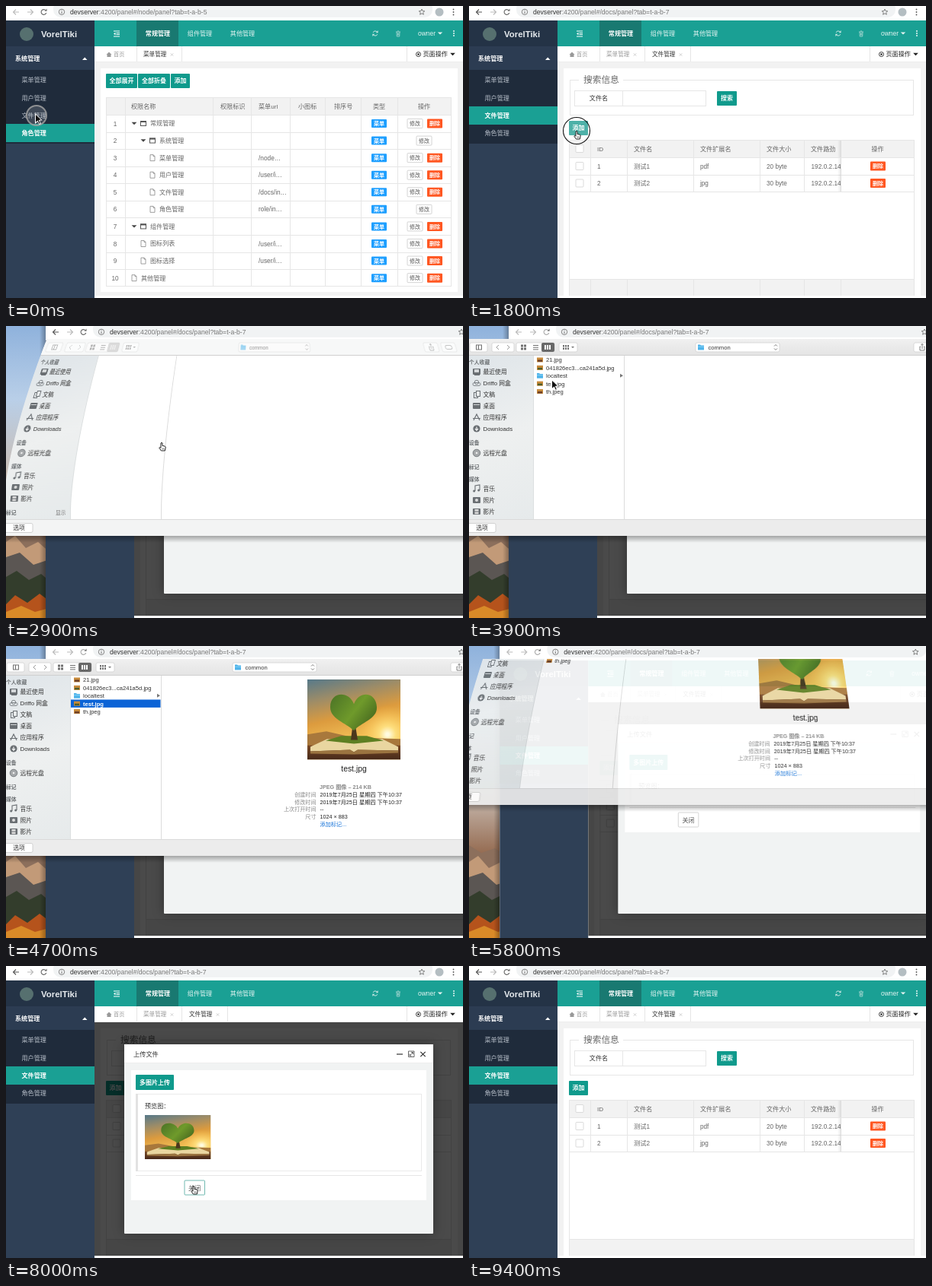
An HTML page with a canvas for the animation above (9.5 s loop, 599 px wide and 384 px high).

```html
<!DOCTYPE html>
<html lang="zh">
<head>
<meta charset="utf-8">
<title>Picture upload</title>
<style>
html,body{margin:0;width:100%;height:100%;overflow:hidden;background:#fff}
canvas{display:block;width:599px;height:384px}
</style>
</head>
<body>
<canvas id="stage" width="599" height="384"></canvas>
<script>
const LOOP = 9500, TEAL = '#1aa094', BTN = '#0f9a8c', ORANGE = '#ff5722';
const PAN = 52, TOP = 17, SHEET_H = 259, MARGIN = 10, SHEET_W = 720;
const FONT = "'Liberation Sans','Noto Sans CJK SC','Noto Sans CJK',sans-serif";
const main = document.getElementById('stage').getContext('2d');
const sheetCanvas = document.createElement('canvas');
sheetCanvas.width = SHEET_W;
sheetCanvas.height = SHEET_H;
const sheetCtx = sheetCanvas.getContext('2d');
let c = main;

// ---------- helpers ----------
function box(x, y, w, h, fill, line) {
  if (fill) { c.fillStyle = fill; c.fillRect(x, y, w, h); }
  if (line) { c.strokeStyle = line; c.lineWidth = 1; c.strokeRect(x + .5, y + .5, w - 1, h - 1); }
}
function round(x, y, w, h, r, fill, line) {
  c.beginPath();
  c.roundRect(x, y, w, h, r);
  if (fill) { c.fillStyle = fill; c.fill(); }
  if (line) { c.strokeStyle = line; c.lineWidth = .8; c.stroke(); }
}
function text(s, x, y, size = 8, color = '#666', align = 'left', weight = 400) {
  c.font = `${weight} ${size}px ${FONT}`;
  c.fillStyle = color;
  c.textAlign = align;
  c.textBaseline = 'alphabetic';
  c.fillText(s, x, y + size * .37);
}
function path(color, width, ...lines) {
  c.strokeStyle = color;
  c.lineWidth = width;
  c.beginPath();
  for (const p of lines)
    for (let i = 0; i < p.length; i += 2) i ? c.lineTo(p[i], p[i + 1]) : c.moveTo(p[0], p[1]);
  c.stroke();
}
function poly(color, ...p) {
  c.fillStyle = color;
  c.beginPath();
  for (let i = 0; i < p.length; i += 2) c.lineTo(p[i], p[i + 1]);
  c.closePath();
  c.fill();
}
function disc(x, y, r, fill, line, width = 1) {
  c.beginPath();
  c.arc(x, y, r, 0, 7);
  if (fill) { c.fillStyle = fill; c.fill(); }
  if (line) { c.strokeStyle = line; c.lineWidth = width; c.stroke(); }
}
function grad(x0, y0, x1, y1, ...colors) {
  const g = c.createLinearGradient(x0, y0, x1, y1);
  colors.forEach((k, i) => g.addColorStop(i / (colors.length - 1), k));
  return g;
}
const vline = (x, y0, y1, color = '#e6e6e6') => box(x, y0, 1, y1 - y0, color);
const hline = (x0, x1, y, color = '#e6e6e6') => box(x0, y, x1 - x0, 1, color);
const down = (x, y, r, color) => poly(color, x - r, y - r / 2, x + r, y - r / 2, x, y + r / 2);
const cross = (x, y, r, color, w = 1) => path(color, w, [x - r, y - r, x + r, y + r], [x - r, y + r, x + r, y - r]);
function button(s, x, y, w, h, fill = BTN, size = 8) {
  round(x, y, w, h, 1, fill);
  text(s, x + w / 2, y + h / 2, size, '#fff', 'center', 700);
}
function key(t, points, ease) {
  if (t <= points[0][0]) return points[0][1];
  for (let i = 1; i < points.length; i++) {
    const [t0, a] = points[i - 1], [t1, b] = points[i];
    if (t <= t1) {
      let u = (t - t0) / (t1 - t0);
      if (ease) u = u * u * (3 - 2 * u);
      return a + (b - a) * u;
    }
  }
  return points[points.length - 1][1];
}

// ---------- browser ----------
function browserBar(t) {
  const file = t >= 300, idle = !file || (t >= 3000 && t < 6200);
  const back = idle ? '#bbb' : '#555';
  box(0, 0, 599, 19, '#fff');
  round(62, -6, 497, 21, 10, '#f1f3f4');
  path(back, 1.1, [17, 8, 9.5, 8], [13, 4.5, 9.5, 8, 13, 11.5]);
  path('#bbb', 1.1, [28, 8, 35.5, 8], [32, 4.5, 35.5, 8, 32, 11.5]);
  c.beginPath(); c.arc(49.5, 8, 3.4, .3, 5.6); c.strokeStyle = idle && file ? '#aaa' : '#666'; c.lineWidth = 1.1; c.stroke();
  poly('#777', 50.5, 6.8, 53.6, 6.8, 53.6, 3.6);
  disc(73, 7.8, 3.7, null, '#777', .9);
  path('#777', 1, [73, 7.2, 73, 10], [73, 5.3, 73, 6.2]);
  text('devserver', 84, 8, 8.6, '#333');
  const w = c.measureText('devserver').width;
  text(file ? ':4200/panel#/docs/panel?tab=t-a-b-7' : ':4200/panel#/node/panel?tab=t-a-b-5', 84 + w, 8, 8.6, '#777');
  c.beginPath();
  for (let i = 0; i < 10; i++) {
    const a = i * Math.PI / 5 - Math.PI / 2, r = i % 2 ? 1.8 : 4;
    c.lineTo(545 + r * Math.cos(a), 8 + r * Math.sin(a));
  }
  c.closePath(); c.strokeStyle = '#666'; c.lineWidth = .8; c.stroke();
  disc(568, 8, 5.5, '#b4bec2');
  for (const y of [4.5, 8, 11.5]) disc(586.5, y, .9, '#555');
}
function topBar() {
  box(0, 19, 116, 35, '#243346');
  disc(27, 37, 9, '#56706f');
  text('VorelTiki', 46, 37, 11.4, '#e6eaee', 'left', 700);
  box(116, 19, 483, 34, TEAL);
  box(171, 19, 55, 34, '#197971');
  path('#fff', 1, [141, 33, 149, 33], [144.5, 35.5, 149, 35.5], [144.5, 37.5, 149, 37.5], [141, 40, 149, 40]);
  poly('#fff', 141, 36.5, 143.5, 34.7, 143.5, 38.3);
  text('常规管理', 199, 36, 8.1, '#fff', 'center', 700);
  text('组件管理', 254, 36, 8.1, '#e4f4f2', 'center');
  text('其他管理', 310, 36, 8.1, '#e4f4f2', 'center');
  const pale = '#c9e8e4';
  for (const a of [.4, 3.5]) { c.beginPath(); c.arc(484, 36, 3.1, a, a + 2.4); c.strokeStyle = pale; c.lineWidth = 1; c.stroke(); }
  poly(pale, 487.6, 32, 487.6, 35.2, 484.8, 35.2);
  poly(pale, 480.4, 40, 480.4, 36.8, 483.2, 36.8);
  path('#a3d5d0', .9, [511, 34, 517, 34], [512, 34, 512.3, 40, 515.7, 40, 516, 34], [513, 33, 515, 33], [513.5, 35.5, 513.5, 38.5], [514.8, 35.5, 514.8, 38.5]);
  text('owner', 540, 36, 8.5, '#e4f4f2');
  down(569, 36, 3.2, '#e4f4f2');
  for (const y of [33, 36, 39]) disc(587, y, .9, '#fff');
}
function sidebar(t) {
  box(0, 54, 116, 330, '#2f4056');
  box(0, 53, 116, 31, '#2c3c52');
  text('系统管理', 12, 69, 8.1, '#fff', 'left', 700);
  poly('#fff', 100, 71, 106.5, 71, 103.2, 67.5);
  box(0, 84, 116, 97, '#1f2b3b');
  const on = t < 200 ? 3 : 2;
  ['菜单管理', '用户管理', '文件管理', '角色管理'].forEach((s, i) => {
    const y = 97.3 + i * 23.3;
    if (i === on) box(0, Math.round(y - 12), 116, 24, TEAL);
    text(s, 20.5, y, 8.1, i === on ? '#fff' : '#b6bec8', 'left', i === on ? 700 : 400);
  });
}
function tabs(t) {
  const file = t >= 300;
  box(116, 53, 483, 21, '#fff');
  poly('#999', 131.5, 64, 135, 60.5, 138.5, 64, 137.5, 64, 137.5, 67, 132.5, 67, 132.5, 64);
  text('首页', 141, 63.5, 7.2, '#999');
  vline(171, 53, 74);
  text('菜单管理', 180, 63.5, 7.6, file ? '#999' : '#333');
  cross(217.5, 64, 1.7, '#c4c4c4', .8);
  vline(230, 53, 74);
  if (file) {
    text('文件管理', 240, 63.5, 7.6, '#333');
    cross(277.5, 64, 1.7, '#c4c4c4', .8);
    vline(290, 53, 74);
  }
  vline(525, 53, 74);
  disc(540.5, 63.5, 3, null, '#222', .9);
  disc(540.5, 63.5, 1.2, '#222');
  text('页面操作', 546.5, 63.5, 8.1, '#222');
  down(585.5, 63.5, 3.3, '#222');
  hline(116, 599, 73, '#eee');
}

// ---------- pages ----------
function smallButton(s, x, y, fill) {
  const w = 20, h = 12;
  if (fill) { button(s, x, y - h / 2, w, h, fill, 7); return; }
  round(x, y - h / 2, w, h, 1, '#fff', '#c9c9c9');
  text(s, x + w / 2, y, 7, '#555', 'center');
}
function folderIcon(x, y) {
  box(x - 4, y - 3.5, 8, 7, null, '#555');
  box(x - 4, y - 3.5, 8, 2, '#555');
}
function fileIcon(x, y) {
  path('#888', .8, [x + 1, y - 4, x - 3, y - 4, x - 3, y + 4, x + 3, y + 4, x + 3, y - 2, x + 1, y - 4, x + 1, y - 2, x + 3, y - 2]);
}
function menuPage() {
  box(124, 82, 468, 294, '#fff');
  button('全部展开', 131, 89, 41, 19);
  button('全部折叠', 173, 89, 42, 19);
  button('添加', 216, 89, 25, 19);
  box(131, 120, 453, 23, '#f2f2f2');
  [['权限名称', 164], ['权限标识', 281], ['菜单url', 331], ['小图标', 383], ['排序号', 430], ['类型', 481], ['操作', 540]]
    .forEach(([s, x]) => text(s, x, 132, 8.1));
  // name, depth, open folder, url
  const rows = [['常规管理', 0, 1], ['系统管理', 1, 1], ['菜单管理', 2, 0, '/node…'], ['用户管理', 2, 0, '/user/i…'],
    ['文件管理', 2, 0, '/docs/in…'], ['角色管理', 2, 0, 'role/in…'], ['组件管理', 0, 1], ['图标列表', 1, 0, '/user/i…'],
    ['图标选择', 1, 0, '/user/i…'], ['其他管理', 0, 0]];
  rows.forEach(([name, depth, open, url], i) => {
    const y = 154.5 + i * 22.57, x = 168 + depth * 12;
    hline(131, 584, Math.round(y - 11.5));
    text(i + 1, 143, y, 8.2, '#666', 'center');
    if (open) { down(x, y, 3.4, '#444'); folderIcon(x + 12, y); }
    else fileIcon(x, y);
    text(name, x + (open ? 21 : 9), y, 8.1);
    if (url) text(url, 331, y, 8.3);
    button('菜单', 479, y - 5.5, 20, 11, '#1e9fff', 7);
    if (i === 1 || i === 5) smallButton('修改', 538, y);
    else { smallButton('修改', 526, y); smallButton('删除', 552, y, ORANGE); }
  });
  for (const x of [131, 156, 271, 321, 372, 418, 465, 513, 583]) vline(x, 120, 369);
  hline(131, 584, 120);
  hline(131, 584, 368);
}
function filePage(t) {
  box(124, 82, 468, 299, '#fff');
  box(132, 97, 451, 47, null, '#e6e6e6');
  box(144, 92, 58, 10, '#fff');
  text('搜索信息', 150, 97, 11.7);
  box(138, 111, 173, 21, null, '#e6e6e6');
  vline(201, 111, 132);
  text('文件名', 170, 121.5, 8.1, '#333', 'center');
  button('搜索', 325, 112, 26, 19);
  button('添加', 131, 151, 25, 19, t >= 1500 && t < 2100 ? '#3aa89e' : BTN);
  box(131, 176, 453, 23, '#f2f2f2');
  const cols = [159, 207, 294, 381, 439];
  ['ID', '文件名', '文件扩展名', '文件大小', '文件路劲'].forEach((s, i) => text(s, cols[i] + 9, 188, 8.1));
  text('操作', 535.5, 188, 8.1, '#666', 'center');
  round(140, 182.5, 10, 10, 1, '#fff', '#d2d2d2');
  const loaded = t >= 500;
  if (loaded) [['1', '测试1', 'pdf', '20 byte'], ['2', '测试2', 'jpg', '30 byte']].forEach((row, i) => {
    const y = 210.5 + i * 22.5;
    round(140, y - 5, 10, 10, 1, '#fff', '#d2d2d2');
    row.forEach((s, j) => text(s, cols[j] + 9, y, 8.2));
    c.save();
    c.beginPath(); c.rect(440, y - 9, 47, 18); c.clip();
    text('192.0.2.144', 448.5, y, 8.3);
    c.restore();
    smallButton('删除', 526, y, ORANGE);
    hline(131, 584, Math.round(y + 11));
  });
  const end = loaded ? 244 : 199;
  cols.forEach(x => vline(x, 176, end));
  c.fillStyle = grad(483, 0, 488, 0, 'rgba(0,0,0,0)', 'rgba(0,0,0,.1)');
  c.fillRect(483, 176, 5, end - 176);
  vline(487, 176, end, '#ddd');
  hline(131, 584, 176);
  hline(131, 584, 199);
  box(131, 360, 453, 21, '#f2f2f2');
  hline(131, 584, 359);
  if (t < 2000) [...cols, 487].forEach(x => vline(x, 360, 381));
  vline(131, 176, 381);
  vline(583, 176, 381);
}

// Heart-shaped tree over an open book, in flat shapes
function photo(x, y, w, h) {
  c.save();
  c.translate(x, y);
  c.scale(w / 122, h / 105);
  c.beginPath(); c.rect(0, 0, 122, 105); c.clip();
  box(0, 0, 122, 105, grad(0, 0, 20, 85, '#56798a', '#9c8c68', '#dc9b3e', '#f0bd55'));
  const sun = c.createRadialGradient(105, 72, 2, 105, 72, 38);
  sun.addColorStop(0, '#fffbe0');
  sun.addColorStop(.25, 'rgba(255,226,130,.9)');
  sun.addColorStop(1, 'rgba(255,190,70,0)');
  box(0, 0, 122, 105, sun);
  poly('#a8783c', 0, 72, 25, 68, 60, 76, 122, 78, 122, 86, 0, 86);
  box(0, 86, 122, 19, grad(0, 86, 0, 105, '#7a4a26', '#46291a'));
  poly('#e9d6a0', 4, 88, 26, 78, 61, 82, 98, 78, 119, 88, 119, 93, 66, 92, 61, 95, 56, 92, 4, 94);
  poly('#9b7440', 4, 94, 56, 92, 61, 95, 66, 92, 119, 93, 119, 96, 61, 98, 4, 97);
  poly('#5e7f22', 24, 80, 44, 74, 78, 74, 100, 80, 61, 84);
  poly('#4b371d', 57, 79, 60, 55, 62, 55, 66, 79);
  c.fillStyle = grad(32, 20, 90, 65, '#4c7426', '#6f9a2b', '#3c5c1c');
  c.beginPath();
  c.moveTo(61, 32);
  c.bezierCurveTo(54, 14, 30, 16, 30, 36);
  c.bezierCurveTo(30, 52, 50, 56, 61, 67);
  c.bezierCurveTo(70, 56, 92, 52, 91, 36);
  c.bezierCurveTo(90, 16, 68, 14, 61, 32);
  c.fill();
  c.restore();
}
function dialog(t) {
  const show = key(t, [[1900, 0], [2200, 1], [8200, 1], [8500, 0]]);
  if (!show) return;
  c.globalAlpha = show;
  box(116, 74, 483, 307, 'rgba(0,0,0,.71)');
  c.save();
  c.translate(357.5, 227.5);
  c.scale(.6 + .4 * show, .6 + .4 * show);
  c.translate(-357.5, -227.5);
  c.save();
  c.shadowColor = 'rgba(0,0,0,.35)';
  c.shadowBlur = 16;
  round(155, 103, 405, 249, 1, '#f1f3f3');
  c.restore();
  box(155, 103, 405, 25, '#fff');
  hline(155, 560, 127, '#eee');
  text('上传文件', 167, 115.5, 8.2, '#333');
  path('#333', 1.2, [512, 116, 520, 116]);
  path('#444', .8, [527.5, 112, 535, 112, 535, 119.5, 527.5, 119.5, 527.5, 112], [529, 118, 533.5, 113.5], [531, 113.5, 533.5, 113.5, 533.5, 116], [529, 115.5, 529, 118, 531.5, 118]);
  cross(546.5, 116, 3.2, '#333', 1.2);
  const full = t >= 6300, dy = full ? 63 : 0;
  box(164, 137, 387, 108 + dy, '#fff');
  button('多图片上传', 170, 143, 50, 20, t >= 2400 && t < 3000 ? '#3aa89e' : BTN);
  box(170, 168, 375, 39 + dy, null, '#eaeaea');
  box(170, 168, 3, 39 + dy, '#e2e2e2');
  text('预览图：', 182, 184, 8.1, '#333');
  if (full) photo(182, 196, 86.5, 58);
  hline(170, 545, 212 + dy);
  const hover = t >= 7400 && t < 8500;
  round(234, 219 + dy, 26.5, 19, 1, '#fff', hover ? '#4fa99f' : '#c9c9c9');
  text('关闭', 247.2, 229 + dy, 8.1, '#555', 'center');
  c.restore();
  c.globalAlpha = 1;
}

// ---------- desktop and file chooser ----------
function wallpaper() {
  box(0, 0, 60, 384, grad(0, 0, 0, 290, '#8fb2dc', '#b9cfe8', '#c9bdb4', '#8a5a3c'));
  poly('#8c6f5c', 0, 262, 16, 272, 34, 266, 60, 284, 60, 384, 0, 384);
  poly('#c29a78', 0, 284, 12, 276, 26, 292, 42, 284, 60, 300, 60, 326, 0, 318);
  poly('#5b5653', 0, 304, 18, 298, 36, 314, 60, 306, 60, 345, 0, 345);
  poly('#333d2c', 0, 330, 14, 322, 30, 334, 46, 326, 60, 338, 60, 384, 0, 384);
  poly('#b5531c', 0, 366, 12, 354, 28, 364, 44, 352, 60, 364, 60, 384, 0, 384);
  poly('#d98a28', 0, 376, 20, 368, 38, 376, 60, 370, 60, 384, 0, 384);
}
function sideIcon(kind, x, y) {
  const g = '#6a6f73';
  if (kind === 'disc') { disc(x, y, 4.8, '#a5a8aa', g, .8); disc(x, y, 1.3, '#eee'); }
  else if (kind === 'down') { disc(x, y, 4.6, g); path('#fff', 1.1, [x, y - 2.5, x, y + 2], [x - 2, y, x, y + 2.3, x + 2, y]); }
  else if (kind === 'cloud') { round(x - 5, y - .5, 10, 4, 2, null, g); disc(x, y - 1, 2.7, null, g, .8); }
  else if (kind === 'app') path(g, 1.2, [x - 4, y + 4, x, y - 4, x + 4, y + 4], [x - 5, y + 1.5, x + 5, y + 1.5]);
  else if (kind === 'note') { path(g, 1.1, [x - 2, y + 3, x - 2, y - 4, x + 4, y - 5, x + 4, y + 2]); disc(x - 3.3, y + 3, 1.5, g); disc(x + 2.7, y + 2, 1.5, g); }
  else if (kind === 'doc') { box(x - 4, y - 3, 6, 8, null, g); box(x - 1, y - 5, 6, 8, '#e7eaeb', g); }
  else {
    round(x - 5, y - 4, 10, 8, 1, g);
    if (kind === 'film') { box(x - 2.5, y - 3, 5, 2.6, '#ddd'); box(x - 2.5, y + .6, 5, 2.6, '#ddd'); }
    if (kind === 'cam') disc(x, y, 2, '#ddd');
    if (kind === 'desk') hline(x - 4, x + 4, y - 2, '#d0d3d5');
    if (kind === 'clock') { box(x - 3, y - 3, 6, 4, '#d5d8da'); box(x - 3, y + 3.5, 7, 1.5, g); }
  }
}
function folder(x, y) {
  poly('#4fb4ea', x - 4, y - 3.4, x - 1, y - 3.4, x, y - 2.4, x + 4, y - 2.4, x + 4, y + 3.4, x - 4, y + 3.4);
  hline(x - 4, x + 4, y - 1.2, '#86d0f6');
}
function sheetToolbar(early) {
  box(-4, TOP, 710, 22, early ? '#f7f8f8' : grad(0, TOP, 0, 39, '#f0f0f0', '#e4e4e4'));
  c.globalAlpha = early ? .5 : 1;
  const line = '#d2d2d2', ink = '#707070';
  for (const [x, w] of [[1, 23], [30, 29], [62, 50], [118, 24], [297, 110], [583, 22], [610, 22]]) round(x, 22, w, 12, 2, '#fff', line);
  box(9, 24.5, 8, 7, null, ink); vline(12, 25, 31, ink);
  path('#999', 1, [39, 25, 36, 28, 39, 31], [50, 25, 53, 28, 50, 31]);
  for (let i = 0; i < 4; i++) box(68 + i % 2 * 4, 24.5 + (i >> 1) * 4, 3, 3, ink);
  for (let i = 0; i < 3; i++) hline(84, 91, 25 + i * 2.7, ink);
  round(95, 22, 17, 12, 2, early ? '#bbb' : '#686868');
  for (let i = 0; i < 3; i++) box(99 + i * 3, 25, 2, 6, '#fff');
  for (let i = 0; i < 6; i++) box(123 + i % 3 * 3, 25 + (i / 3 | 0) * 3.5, 2, 2.5, ink);
  down(136, 28, 2, ink);
  folder(304, 28);
  text('common', 313.5, 28, 7.6, '#333');
  path(ink, .9, [400, 26.5, 402, 24.5, 404, 26.5], [400, 29.5, 402, 31.5, 404, 29.5]);
  path(ink, .9, [592, 27, 591, 27, 591, 32, 597, 32, 597, 27, 596, 27], [594, 30, 594, 23.5], [592.5, 25, 594, 23.5, 595.5, 25]);
  round(616, 25.5, 10, 5, 2, null, ink);
  c.globalAlpha = 1;
  hline(-4, 706, 38, '#d0d0d0');
}
function sheetBody(t) {
  const early = t < 3100, picked = t >= 4000;
  sheetToolbar(early);
  box(-4, 39, 89, 215, grad(0, 39, 85, 254, '#dfe5e9', '#eef0f0', '#e6eaeb'));
  box(85, 39, 621, 215, '#fff');
  vline(84, 39, 254, '#dcdfe0');
  vline(203, 39, 254, '#dcdcdc');
  const head = (s, y) => text(s, 0, y, 6.8, '#6b6f72', 'left', 700);
  head('个人收藏', 47);
  [['clock', '最近使用'], ['cloud', 'Driffo 网盒'], ['doc', '文稿'], ['desk', '桌面'], ['app', '应用程序'], ['down', 'Downloads']]
    .forEach(([k, s], i) => { sideIcon(k, 10, 60 + i * 15); text(s, 18.5, 60 + i * 15, 7.8, '#333'); });
  head('设备', 153.5);
  sideIcon('disc', 10, 167); text('远程光盘', 18.5, 167, 7.8, '#333');
  const dy = early ? 0 : 17;
  head('媒体', 184 + dy);
  [['note', '音乐'], ['cam', '照片'], ['film', '影片']]
    .forEach(([k, s], i) => { sideIcon(k, 10, 197 + dy + i * 15); text(s, 18.5, 197 + dy + i * 15, 7.8, '#333'); });
  head('标记', early ? 245 : 185);
  if (early) text('显示', 65, 245, 6.8, '#777');
  if (!early) ['21.jpg', '041826ec3...ca241a5d.jpg', 'localtest', 'test.jpg', 'th.jpeg'].forEach((s, i) => {
    const y = 44.5 + i * 10.4, on = picked && i === 3;
    if (on) box(85, y - 5.2, 117.5, 10.4, '#0b63d6');
    if (i === 2) { folder(93, y); poly('#777', 198, y - 2.5, 202, y, 198, y + 2.5); }
    else { box(89, y - 3, 8, 6, '#c78a3a'); box(90, y, 6, 2.4, i % 2 ? '#4d5d2a' : '#6b3f2a'); }
    text(s, 101, y, 7.6, on ? '#fff' : '#333', 'left', on ? 700 : 400);
  });
  if (picked) {
    photo(395, 44, 122, 105.5);
    text('test.jpg', 456, 161.5, 10.4, '#222', 'center');
    text('JPEG 图像 – 214 KB', 411, 185, 7.2, '#8a8a8a', 'left', 700);
    const date = '2019年7月25日 星期四 下午10:37';
    [['创建时间', date], ['修改时间', date], ['上次打开时间', '--'], ['尺寸', '1024 × 883'], ['', '添加标记...']].forEach(([a, b], i) => {
      const y = 195 + i * 9.9;
      text(a, 406.5, y, 7.1, '#8a8a8a', 'right');
      text(b, 411.5, y, 7.2, i === 4 ? '#1673d8' : '#222');
    });
  }
  box(-4, 254, 710, 22, early ? '#f3f4f4' : '#ececec');
  hline(-4, 706, 254, '#dadada');
  round(-3, 259.5, 38, 12, 2, '#fff', '#c8c8c8');
  text('选项', 17, 265.5, 7.8, '#333', 'center');
}
function drawSheet(t, lift, pan) {
  const bend = key(t, [[2400, .02], [2800, .0185], [2900, .017], [3200, 0], [5500, 0], [5700, .011], [5800, .0142], [6100, .021]]);
  const flare = t > 5000 ? 14 * Math.min(1, lift / 67) : 0;
  c.save();
  c.globalAlpha = lift ? .93 : 1;
  const bottom = TOP + SHEET_H - lift;
  if (!bend && !flare) {
    box(-4, bottom, 710, 9, grad(0, bottom, 0, bottom + 9, 'rgba(0,0,0,.32)', 'rgba(0,0,0,0)'));
    sheetBody(t);
  } else {
    box(0, bottom, 599, 9, grad(0, bottom, 0, bottom + 9, 'rgba(0,0,0,.32)', 'rgba(0,0,0,0)'));
    c = sheetCtx;
    c.clearRect(0, 0, SHEET_W, SHEET_H);
    c.save();
    c.translate(MARGIN, -TOP);
    sheetBody(t);
    c.restore();
    c = main;
    const cx = 298 + pan;
    for (let y = TOP; y < bottom; y++) {
      const shift = bend * Math.max(0, 240 - y) ** 1.5 - flare, s = 1 - shift / 350;
      const src = Math.min(SHEET_H - 1, Math.floor(y - TOP + lift));
      c.drawImage(sheetCanvas, 0, src, SHEET_W, 1, cx - SHEET_W / 2 * s, y, SHEET_W * s, 1);
    }
  }
  c.restore();
}

// ---------- pointer ----------
function hand(x, y) {
  c.save();
  c.translate(x, y);
  c.beginPath();
  c.moveTo(-2, 0); c.lineTo(-2, -5); c.quadraticCurveTo(-1, -6.4, 0, -5); c.lineTo(0, -1.6);
  c.lineTo(3.2, -.9); c.quadraticCurveTo(4.4, -.4, 4.2, 1); c.lineTo(3.3, 5); c.lineTo(-1.6, 5);
  c.lineTo(-4.2, 1.2); c.quadraticCurveTo(-4, -.4, -2, 1.2);
  c.closePath();
  c.fillStyle = '#fff'; c.fill();
  c.strokeStyle = '#222'; c.lineWidth = 1; c.stroke();
  path('#222', .7, [0, 1.5, 0, 3.5], [1.8, 1.5, 1.8, 3.5]);
  c.restore();
}
function arrow(x, y) {
  c.save();
  c.translate(x - 3, y - 5);
  poly('#fff', -1, -2, 8.5, 7.3, 5, 7.8, 7, 12, 4.4, 13, 2.5, 9, -1, 12);
  poly('#111', 0, 0, 6.8, 6.6, 3.8, 6.9, 5.8, 11.2, 4.6, 11.8, 2.7, 7.4, 0, 9.8);
  c.restore();
}
function ring(t, at, x, y) {
  const u = (t - at) / 300;
  if (u < 0 || u > 1) return;
  const strong = at === 1700;
  disc(x, y, strong ? 15.5 + 6 * u : 13 + 8 * u, `rgba(255,255,255,${.15 * (1 - u)})`,
    strong ? `rgba(20,20,20,${Math.min(1, 1.5 * (1 - u))})` : `rgba(160,160,160,${.85 * (1 - u)})`, strong ? 1.1 : 2);
}
function pointer(t) {
  const x = key(t, [[500, 42], [1500, 142], [2100, 142], [2450, 205], [3400, 205], [3900, 112], [4200, 112], [4600, 620], [6350, 620], [7500, 247], [8500, 247], [9300, 620]], true);
  const y = key(t, [[500, 148], [1500, 170], [2100, 170], [2450, 159], [3400, 159], [3900, 77], [4200, 77], [4600, 250], [6350, 250], [7500, 295], [8500, 295], [9300, 240]], true);
  ring(t, 0, 40, 144);
  ring(t, 1700, 141, 164);
  ring(t, 2500, 204, 154);
  ring(t, 4000, 109, 73);
  ring(t, 8100, 246, 290);
  const free = t < 100 || (t > 600 && t < 1400) || (t > 3300 && t < 7300) || t > 8500;
  (free ? arrow : hand)(x, y);
}

function draw(t) {
  c = main;
  c.clearRect(0, 0, 599, 384);
  const lift = key(t, [[2400, SHEET_H], [2600, 140], [2800, 22], [2900, 0], [5600, 0], [5800, 67], [6100, SHEET_H]]);
  const pan = PAN * (1 - lift / SHEET_H) ** .85;
  if (pan > 0) {
    wallpaper();
    box(pan - 8, 0, 8, 384, grad(pan - 8, 0, pan, 0, 'rgba(0,0,0,0)', 'rgba(0,0,0,.3)'));
  }
  c.save();
  c.translate(pan, 0);
  box(0, 0, 599, 384, '#fff');
  browserBar(t);
  topBar();
  sidebar(t);
  tabs(t);
  box(116, 74, 483, 307, '#f2f2f2');
  t < 300 ? menuPage() : filePage(t);
  dialog(t);
  c.restore();
  if (lift < SHEET_H) drawSheet(t, lift, pan);
  pointer(t);
}

const start = performance.now();
function tick() {
  const t = (performance.now() - start) % LOOP;
  draw(Math.floor(t / 100) * 100);
  requestAnimationFrame(tick);
}
tick();
</script>
</body>
</html>
```
